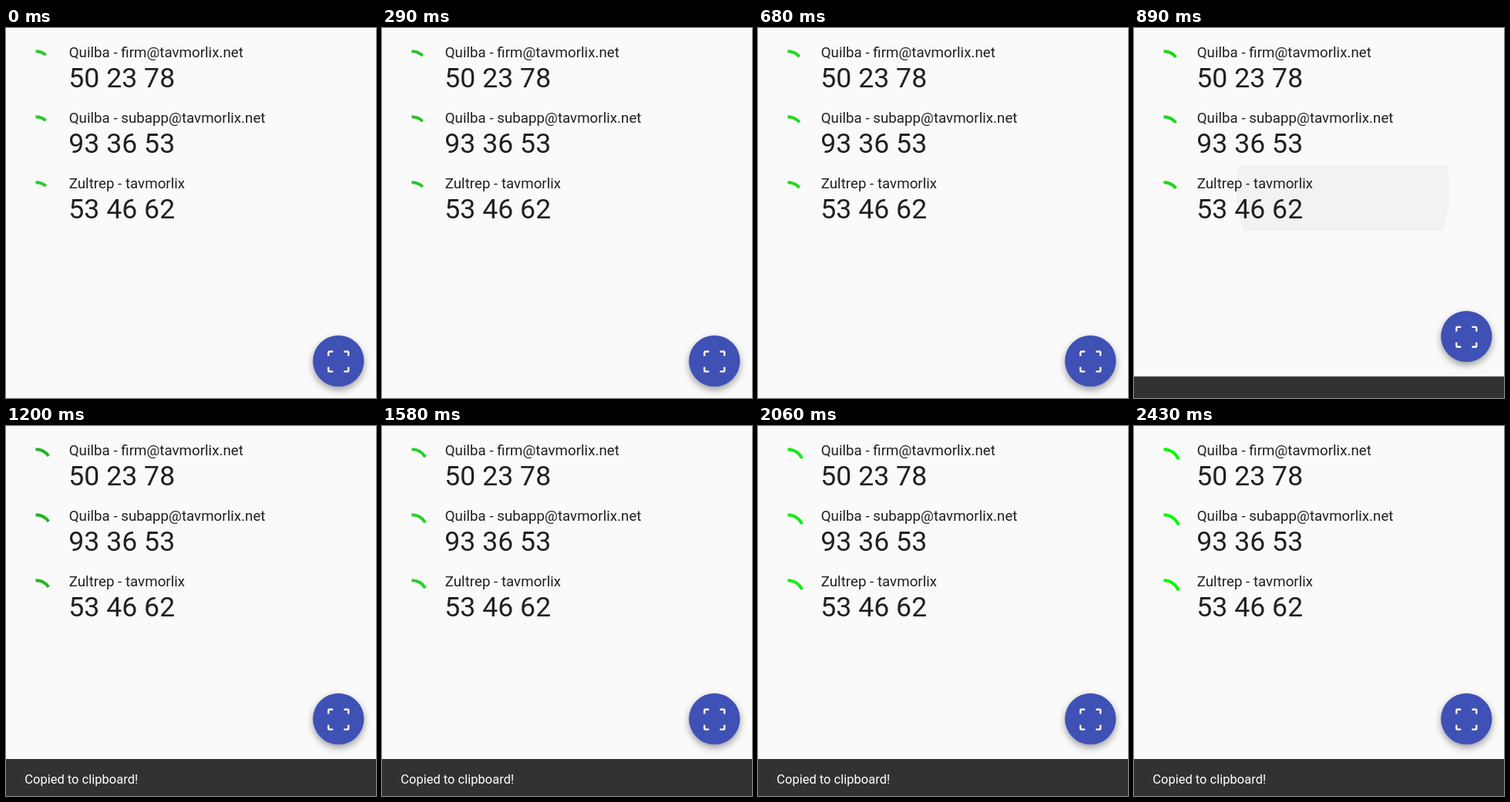
Write an HTML page with a canvas that moves like this. It is 480 by 480 pixels and loops after 2510 ms.

```html
<!DOCTYPE html>
<html lang="en">
<head>
<meta charset="utf-8">
<title>One-time codes</title>
<style>
  html, body { margin: 0; width: 100%; height: 100%; overflow: hidden; background: #fafafa; }
  canvas { display: block; width: 480px; height: 480px; }
</style>
</head>
<body>
<canvas id="stage"></canvas>
<script>
const SIZE = 480;
const LOOP = 2510;
const ROW_TOP = 8;
const ROW_H = 85;
const TAP = 784;      // the third row is tapped
const SNACK_START = 791;
const SNACK_MS = 250;
const SNACK_H = 52;

const rows = [
  ['Quilba - firm@tavmorlix.net', '50 23 78'],
  ['Quilba - subapp@tavmorlix.net', '93 36 53'],
  ['Zultrep - tavmorlix', '53 46 62']
];

// time, red and blue, green
const greens = [
  [0, 46, 200], [170, 48, 186], [680, 30, 218], [890, 28, 216],
  [1200, 34, 180], [1820, 42, 224], [2430, 0, 250], [LOOP, 0, 250]
];

const canvas = document.getElementById('stage');
const ctx = canvas.getContext('2d');
const ratio = window.devicePixelRatio || 1;
canvas.width = canvas.height = SIZE * ratio;

const clamp = v => Math.min(1, Math.max(0, v));
const lerp = (a, b, k) => a + (b - a) * k;

// cubic-bezier(0.4, 0, 0.2, 1)
function ease(x) {
  if (x <= 0 || x >= 1) return clamp(x);
  let lo = 0, hi = 1, s = 0.5;
  for (let i = 0; i < 24; i++) {
    s = (lo + hi) / 2;
    const bx = 1.2 * s * (1 - s) ** 2 + 0.6 * s * s * (1 - s) + s ** 3;
    if (bx < x) lo = s; else hi = s;
  }
  return s * s * (3 - 2 * s);
}

function greenAt(t) {
  const i = greens.findIndex(k => k[0] > t);
  const a = greens[i - 1], b = greens[i];
  const k = (t - a[0]) / (b[0] - a[0]);
  const rb = lerp(a[1], b[1], k);
  return `rgb(${rb}, ${lerp(a[2], b[2], k)}, ${rb})`;
}

function text(str, x, y, size, color) {
  ctx.font = `${size}px Roboto, sans-serif`;
  ctx.fillStyle = color;
  ctx.fillText(str, x, y);
}

function disc(x, y, r) {
  ctx.beginPath();
  ctx.arc(x, y, r, 0, Math.PI * 2);
  ctx.fill();
}

function drawRipple(t) {
  const dt = t - TAP;
  if (dt < -35 || dt > 200) return;
  const alpha = dt < 0 ? 1 + dt / 35 : 1 - dt / 200;
  const radius = dt < 0 ? 13.5 + dt * 0.38 : 13.5 + dt * 1.17;
  ctx.save();
  ctx.beginPath();
  ctx.rect(0, ROW_TOP + 2 * ROW_H, SIZE, ROW_H);
  ctx.clip();
  ctx.fillStyle = `rgba(200, 200, 200, ${0.37 * alpha})`;
  disc(271, 211, radius);
  ctx.restore();
}

function drawRows(t) {
  const start = -Math.PI / 2;
  const sweep = (40 + 12 * t / 1000) * Math.PI / 180;
  const green = greenAt(t);
  rows.forEach(([title, code], i) => {
    const top = ROW_TOP + i * ROW_H;
    ctx.strokeStyle = green;
    ctx.lineWidth = 4;
    ctx.beginPath();
    ctx.arc(38.5, top + 42.8, 20.6, start, start + sweep);
    ctx.stroke();
    text(title, 81.7, top + 30, 18.75, '#202020');
    text(code, 81.3, top + 69, 35.65, '#202020');
  });
}

function drawButton(y) {
  const x = 431.3;
  ctx.save();
  ctx.shadowColor = 'rgba(0, 0, 0, 0.38)';
  ctx.shadowBlur = 10 * ratio;
  ctx.shadowOffsetY = 4 * ratio;
  ctx.fillStyle = '#3f51b5';
  disc(x, y, 33.2);
  ctx.restore();

  ctx.save();
  ctx.translate(x, y + 0.7);
  ctx.scale(1.18, 1.18);
  ctx.strokeStyle = '#fff';
  ctx.lineWidth = 2;
  for (let i = 0; i < 4; i++) {
    ctx.beginPath();
    ctx.moveTo(-11, -6);
    ctx.arcTo(-11, -11, -6, -11, 1);
    ctx.lineTo(-6, -11);
    ctx.stroke();
    ctx.rotate(Math.PI / 2);
  }
  ctx.restore();
}

function drawSnack(top, progress) {
  if (progress <= 0) return;
  ctx.fillStyle = '#323232';
  ctx.fillRect(0, top, SIZE, SIZE - top);
  ctx.globalAlpha = ease((progress - 0.72) / 0.28);
  text('Copied to clipboard!', 24.3, top + 32, 16.5, '#fff');
  ctx.globalAlpha = 1;
}

function draw(t) {
  ctx.setTransform(ratio, 0, 0, ratio, 0, 0);
  ctx.fillStyle = '#fafafa';
  ctx.fillRect(0, 0, SIZE, SIZE);

  const progress = clamp((t - SNACK_START) / SNACK_MS);
  const lift = SNACK_H * ease(progress);
  drawRipple(t);
  drawRows(t);
  drawSnack(SIZE + 4 - lift, progress);
  drawButton(432 - lift);
}

const begin = performance.now();
function tick() {
  draw((performance.now() - begin) % LOOP);
  requestAnimationFrame(tick);
}
tick();
</script>
</body>
</html>
```
